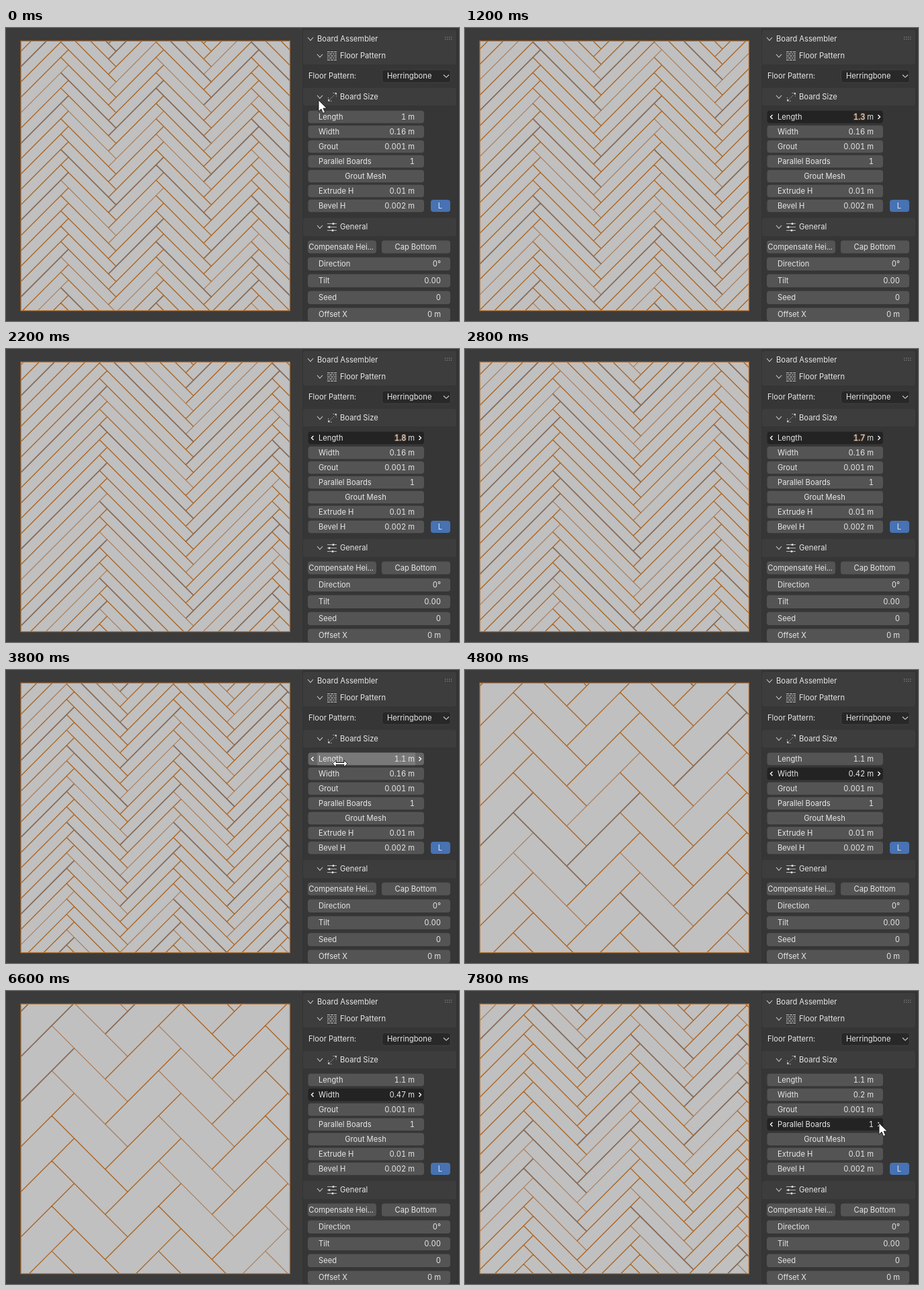
An HTML page that plays this animation: 674x435 px, repeating every 8 s.

```html
<!DOCTYPE html>
<html lang="en">
<head>
<meta charset="utf-8">
<title>Herringbone floor settings</title>
<style>
  html, body { margin: 0; width: 100%; height: 100%; overflow: hidden; background: #3b3b3b; }
  svg { display: block; }
  text { font: 11.2px Inter, sans-serif; font-variant-numeric: tabular-nums; fill: #e8e8e8; white-space: pre; }
  .end { text-anchor: end; }
  .mid { text-anchor: middle; }
  .drag { fill: #ece4dc; stroke: #5e4434; stroke-width: 2; paint-order: stroke; }
  .line { fill: none; stroke: #d0d0d0; stroke-width: 1.1; }
  .icon { stroke: #c4c4c4; stroke-width: .9; }
</style>
</head>
<body>
<svg id="stage" width="674" height="435" viewBox="0 0 674 435">
  <defs><clipPath id="floorClip"><rect x="22.1" y="19.3" width="400.3" height="400.3"/></clipPath></defs>
  <rect width="674" height="435" fill="#3b3b3b"/>
  <rect x="22.1" y="19.3" width="400.3" height="400.3" fill="#c0c0c0"/>
  <g clip-path="url(#floorClip)" fill="none">
    <path id="thin" stroke="#ab7c58" stroke-width="1.2"/>
    <path id="plain" stroke="#aa6626" stroke-width="1.4"/>
    <path id="heavy" stroke="#876b58" stroke-width="1.8"/>
  </g>
  <rect x="22.1" y="19.3" width="400.3" height="400.3" fill="none" stroke="#b37538" stroke-width="1.3"/>
  <g id="panel"></g>
  <g id="fields"></g>
  <g id="cursor"></g>
</svg>
<script>
const $ = id => document.getElementById(id);
const LOOP = 8000, STEP = 200;
const SCALE = 100.1, LEFT = 22.1, BOTTOM = 419.6, GROUT = 0.001;

// Keyframes as [time, value]
const lengthKeys = [[400, 1], [1200, 1.274], [2200, 1.813], [2400, 1.86], [2800, 1.692], [3600, 1.1215]];
const widthKeys = [[4200, .16], [5800, .85], [6000, .88], [7000, .2]];

const rect = (x, y, w, h, fill, r = 0, extra = '') =>
  `<rect x="${x}" y="${y}" width="${w}" height="${h}" rx="${r}" fill="${fill}" ${extra}/>`;
const text = (x, y, s, cls = '') => `<text x="${x}" y="${y + 4}" class="${cls}">${s}</text>`;
const line = (d, cls = '', extra = '') => `<path class="line ${cls}" d="${d}" ${extra}/>`;
const chevron = (x, y) => line(`M${x - 4} ${y - 2}l4 4.5l4-4.5`);

function sample(keys, t) {
  if (t <= keys[0][0]) return keys[0][1];
  for (let i = 1; i < keys.length; i++) {
    const [t0, a] = keys[i - 1], [t1, b] = keys[i];
    if (t <= t1) return a + (b - a) * (t - t0) / (t1 - t0);
  }
  return keys[keys.length - 1][1];
}

function drawFloor(length, width) {
  const a = (length + GROUT) * SCALE * Math.SQRT1_2;
  const b = (width + GROUT) * SCALE * Math.SQRT1_2;
  const paths = { thin: '', plain: '', heavy: '' };
  // Sub-pixel position of a diagonal decides how strongly it shows
  const add = (x, y, dx, dy) => {
    const c = dx * dy > 0 ? x - y - .22 : x + y - .43;
    const off = Math.abs(c - Math.round(c));
    const kind = off < .09 ? 'heavy' : off > .42 ? 'thin' : 'plain';
    paths[kind] += `M${x.toFixed(2)} ${y.toFixed(2)}l${dx.toFixed(2)} ${dy.toFixed(2)}`;
  };
  for (let x = LEFT - a; x < 422 + 2 * b; x += 2 * a) {
    const rows = Math.ceil(2 * a / (2 * b));
    for (let y = BOTTOM + rows * 2 * b; y > 19 - 2 * a - 4 * b; y -= 2 * b) {
      add(x, y, a, a);
      add(x, y, -b, b);
      add(x + a - b, y + a + b, a, -a);
      add(x + 2 * a - b, y + b, b, b);
    }
  }
  for (const id in paths) $(id).setAttribute('d', paths[id]);
}

function buildPanel() {
  let s = rect(441, 0, 233, 435, '#343434') + rect(442, 3, 228, 432, '#363636', 4);
  for (const [y, h] of [[3, 51], [89, 26], [282, 27]]) s += rect(442, y, 228, h, '#3d3d3d', 3);
  s += chevron(453, 16) + chevron(467, 41) + chevron(467, 102) + chevron(467, 295);
  s += text(463, 16, 'Board Assembler') + text(497, 41, 'Floor Pattern') +
       text(497, 102, 'Board Size') + text(497, 295, 'General');
  for (let i = 0; i < 8; i++) s += rect(653 + i % 4 * 3, 13 + (i >> 2) * 3, 1.2, 1.2, '#8a8a8a');

  for (let i = 0; i < 5; i++)
    s += line(`M478 ${35.5 + i * 3}h14`, '', `stroke-dasharray="${i % 2 ? '2 1 4 1' : '4 1'}"`);
  s += line('M482.5 105.5l6-6M479.5 103v5.5h5.5M486.5 96.5h5v5', 'icon', 'stroke-dasharray="1.5 1.5"') +
       rect(479, 106, 2.5, 2.5, '#c4c4c4') + rect(489.5, 96, 2.5, 2.5, '#c4c4c4');
  for (const [i, x] of [[0, 487], [1, 481], [2, 486]]) {
    const y = 290.5 + i * 5;
    s += line(`M478 ${y}h14`, 'icon') + `<circle cx="${x}" cy="${y}" r="1.6" fill="#e0e0e0"/>`;
  }

  s += text(450, 71, 'Floor Pattern:') +
       rect(559.5, 62, 102, 19, '#282828', 4, 'stroke="#404040"') +
       text(567, 71, 'Herringbone') + line('M651 69.5l4 3.8l4-3.8');
  s += rect(632, 255, 29, 18, '#4772b3', 4) + text(646, 264, 'L', 'mid');
  s += rect(449, 315.5, 102, 19, '#545454', 4) + text(498.5, 325, 'Compensate Hei...', 'mid') +
       rect(559, 315.5, 102, 19, '#545454', 4) + text(609.5, 325, 'Cap Bottom', 'mid');
  [['Direction', '0°'], ['Tilt', '0.00'], ['Seed', '0'], ['Offset X', '0 m']].forEach(([name, value], i) => {
    const y = 350 + i * 25;
    s += rect(449, y - 9.5, 212, 19.5, '#545454', 4) + text(465, y, name) + text(647, y, value, 'end');
  });
  $('panel').innerHTML = s;
}

function drawFields(length, width, active, mode) {
  const rows = [
    ['Length', +length.toFixed(1) + ' m'], ['Width', +width.toFixed(2) + ' m'],
    ['Grout', '0.001 m'], ['Parallel Boards', '1'], ['Grout Mesh'],
    ['Extrude H', '0.01 m'], ['Bevel H', '0.002 m']
  ];
  $('fields').innerHTML = rows.map(([name, value], i) => {
    const y = 132 + i * 22, on = i === active, hover = on && mode === 'hover';
    let s = rect(449.5, y - 9.3, 172.5, 18.6, on ? (hover ? '#656565' : '#232323') : '#545454', 4);
    if (!value) return s + text(535, y, name, 'mid');
    if (hover) s += rect(463, y - 9.3, 146, 18.6, '#797979');
    if (on) s += line(`M457.5 ${y - 3}l-3 3l3 3M614.5 ${y - 3}l3 3l-3 3`, '', 'style="stroke:#fff;stroke-width:1.4"');
    s += text(465, y, name);
    if (on && mode === 'drag' && i === 0)
      return s + text(608, y, 'm', 'end') + text(595.5, y, length.toFixed(1), 'end drag');
    return s + text(608, y, value, 'end');
  }).join('');
}

const arrow = 'M0 0V17L4 13.3L6.6 19.5L9.7 18.2L7 12.2H12.3Z';
const resize = 'M-11 0L-6-5V-1.5H6V-5L11 0L6 5V1.5H-6V5Z';

function drawCursor(shape, x, y) {
  $('cursor').innerHTML = shape
    ? `<path d="${shape}" transform="translate(${x} ${y})" fill="#fff" stroke="#111" stroke-width=".9"/>` : '';
}

// Pointer state: focused row, its mode, cursor shape and place
function pointer(t) {
  if (t < 200) return [-1, '', arrow, 465, 107];
  if (t < 400) return [0, 'hover', resize, 497, 133];
  if (t < 3800) return [0, 'drag'];
  if (t < 4000) return [0, 'hover', resize, 497, 139];
  if (t < 4200) return [1, 'hover', resize, 499, 154];
  if (t < 7200) return [1, 'drag'];
  if (t < 7800) return [3, 'hover', arrow, 608 + (t - 7200) / 50, 194 + (t - 7200) / 200];
  return [3, 'press', arrow, 616, 196];
}

let last = -1;
function render(ms) {
  const t = Math.floor(ms % LOOP / STEP) * STEP;
  if (t !== last) {
    last = t;
    const length = sample(lengthKeys, t), width = sample(widthKeys, t);
    const [row, mode, shape, x, y] = pointer(t);
    drawFloor(length, width);
    drawFields(length, width, row, mode);
    drawCursor(shape, x, y);
  }
}

buildPanel();
render(0);
const start = performance.now();
(function tick() {
  render(performance.now() - start);
  requestAnimationFrame(tick);
})();
</script>
</body>
</html>
```
